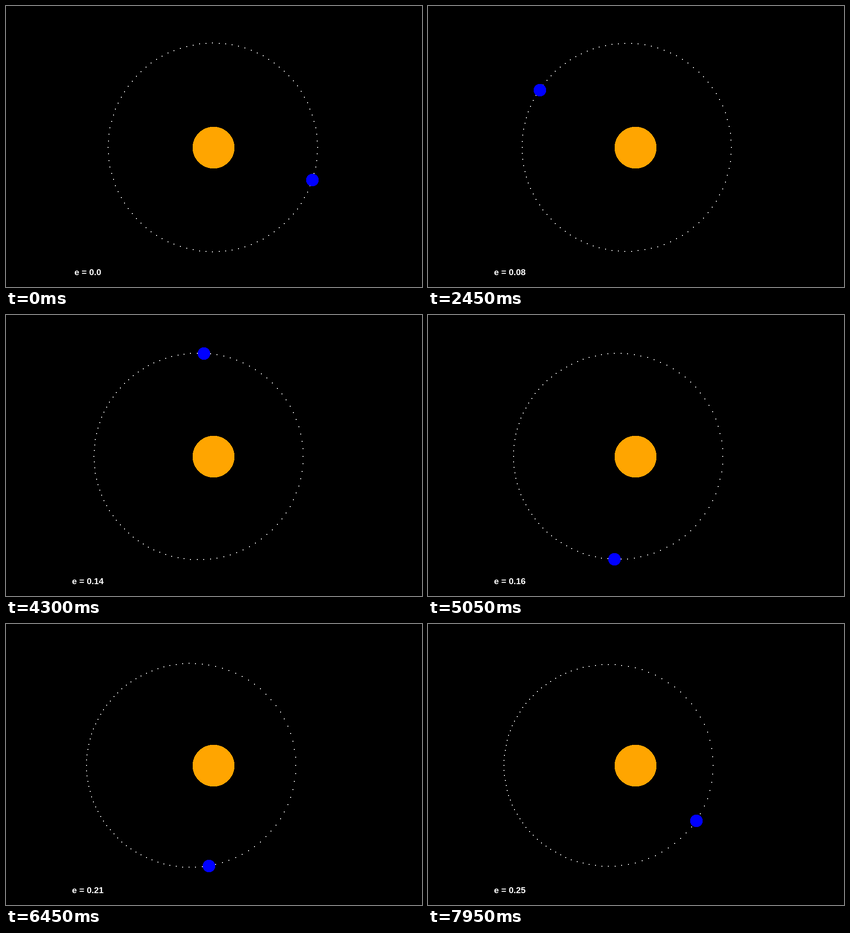
Write an HTML page with a canvas that moves like this. It is 909 by 616 pixels and loops after 8000 ms.

```html
<!DOCTYPE html>
<html lang="en">
<head>
<meta charset="utf-8">
<title>Orbit with growing eccentricity</title>
<style>
  html, body { margin: 0; width: 100%; height: 100%; overflow: hidden; background: #000; }
  canvas { display: block; }
</style>
</head>
<body>
<canvas id="stage" width="909" height="616"></canvas>
<script>
const ctx = document.getElementById('stage').getContext('2d');
const LOOP = 8000, STEP = 70, GRID = 50;
const DOTS = 100, AXIS = 228.6, ECC_PER_TICK = 0.0005;
const FOCUS = { x: 452.55, y: 309.95 };

// Key points of the uneven pace: time in ms, orbit ticks reached.
const PACE = [[0, 5], [1200, 80], [2450, 160], [3650, 239], [5050, 323], [6450, 419], [7950, 507]];

// The picture advances every STEP ms, shown from the next GRID mark on.
function lastUpdate(time) {
  const mark = Math.floor(time / GRID) * GRID;
  return Math.floor(mark / STEP) * STEP;
}

function tickAt(update) {
  const time = Math.ceil(update / GRID) * GRID;
  const next = Math.max(1, PACE.findIndex(([t]) => t >= time));
  const [t0, n0] = PACE[next - 1], [t1, n1] = PACE[next];
  return Math.round(n0 + (n1 - n0) * (time - t0) / (t1 - t0));
}

// Position after a number of ticks of equal mean anomaly (Kepler's equation).
function orbitPoint(tick, ecc) {
  const mean = (tick % DOTS) / DOTS * 2 * Math.PI;
  let E = mean;
  for (let i = 0; i < 8; i++) E -= (E - ecc * Math.sin(E) - mean) / (1 - ecc * Math.cos(E));
  return [
    Math.round(FOCUS.x + AXIS * (Math.cos(E) - ecc)),
    Math.round(FOCUS.y + AXIS * Math.sqrt(1 - ecc * ecc) * Math.sin(E))
  ];
}

// Disc with hard edges, centred on a pixel.
function disc(x, y, r, color) {
  ctx.fillStyle = color;
  for (let row = -Math.floor(r); row <= r; row++) {
    const half = Math.floor(Math.sqrt(r * r - row * row));
    ctx.fillRect(x - half, y + row, 2 * half + 1, 1);
  }
}

function draw(tick) {
  const ecc = tick * ECC_PER_TICK;
  ctx.fillStyle = '#000';
  ctx.fillRect(0, 0, 909, 616);
  disc(Math.round(FOCUS.x), Math.round(FOCUS.y), AXIS * 0.2, '#ffa500');

  ctx.fillStyle = '#fff';
  for (let i = 0; i < DOTS; i++) {
    const [x, y] = orbitPoint(i, ecc);
    ctx.fillRect(x - 1, y - 1, 2, 2);
  }
  disc(...orbitPoint(tick, ecc), AXIS * 0.06, '#00f');

  const value = Math.round(ecc * 100) / 100;
  ctx.fillStyle = '#fff';
  ctx.font = 'bold 19px "Liberation Sans", Arial, sans-serif';
  ctx.textAlign = 'center';
  ctx.fillText('e = ' + (value || '0.0'), 178.8, 590);
}

function frame() {
  draw(tickAt(lastUpdate(performance.now() % LOOP)));
  requestAnimationFrame(frame);
}
frame();
</script>
</body>
</html>
```
